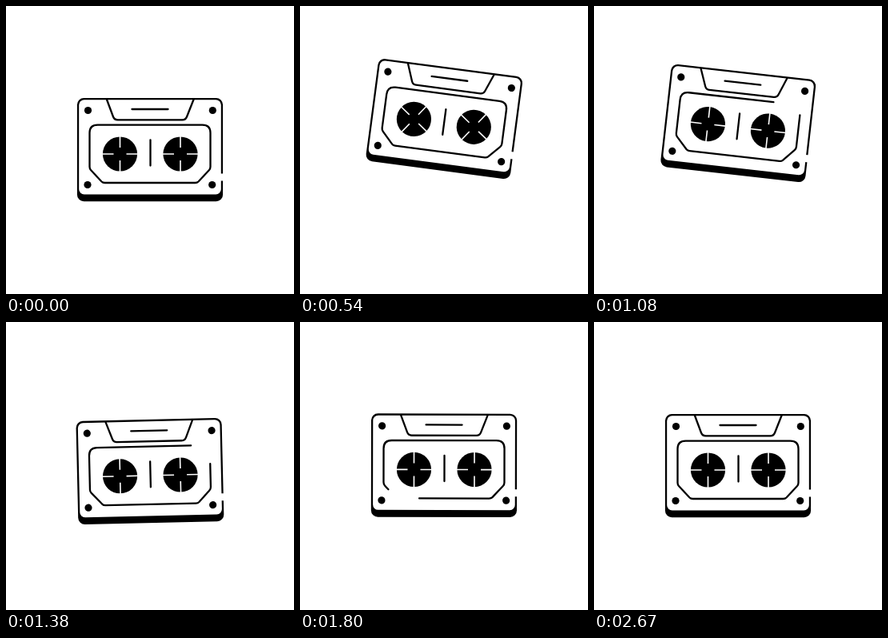
Recreate the animation shown at these times as an HTML page. Size 360 px wide and 360 px high, loop 2.73 s.

```html
<!DOCTYPE html>
<html lang="en">
<head>
<meta charset="utf-8">
<title>Cassette</title>
<style>
  html, body { margin: 0; width: 100%; height: 100%; overflow: hidden; background: #fff; }
  svg { display: block; width: 100%; height: 100%; }
  .line { fill: none; stroke: #000; stroke-width: 2.3; stroke-linecap: round; stroke-linejoin: round; }
  .cut { fill: none; stroke: #fff; stroke-width: 1.6; }
</style>
</head>
<body>
<svg viewBox="0 0 360 360">
  <defs>
    <g id="reel">
      <circle r="21.6"/>
      <path class="cut" d="M0-22.5V-8M0 22.5V8M-22.5 0H-8M22.5 0H8"/>
    </g>
  </defs>
  <g id="tape">
    <rect x="88.9" y="115" width="182.2" height="129.3" rx="8.5"/>
    <rect x="91.2" y="117.3" width="177.6" height="118.2" rx="6.5" fill="#fff"/>
    <path d="M268 209.5H273V218.5H268Z" fill="#fff"/>
    <path class="line" d="M126 117L134 138.500Q135.500 142.300 139.500 142.300H220.500Q224.500 142.300 226 138.500L234.500 117M157.500 129H202.500M180.500 167.500V199.500"/>
    <path class="line" id="frame" pathLength="417" d="M221 148.600H245.500Q255.500 148.600 255.500 158.600V201Q255.500 203.500 253.800 205.300L240.500 219.500Q239 221 236.500 221H123.500Q121 221 119.500 219.500L106.200 205.300Q104.500 203.500 104.500 201V158.600Q104.500 148.600 114.500 148.600Z"/>
    <circle cx="102.500" cy="130.500" r="4.600"/>
    <circle cx="258.300" cy="130.500" r="4.600"/>
    <circle cx="102" cy="223.500" r="4.600"/>
    <circle cx="257.700" cy="223.500" r="4.600"/>
    <use class="spin" href="#reel" data-x="142.500"/>
    <use class="spin" href="#reel" data-x="218"/>
  </g>
</svg>
<script>
const LOOP = 2730, LAST = 74, EDGE = 417, GAP = 43;
// [step, vertical shift]
const LIFT = [[0, 0], [9, -41.6], [24, -33.2], [30, -33.2], [38.5, 7.3], [50, -0.5], [60, 0], [75, 0]];

const tape = document.getElementById('tape');
const frame = document.getElementById('frame');
const reels = document.querySelectorAll('.spin');

function smooth(a, b, x) {
  const u = Math.min(1, Math.max(0, (x - a) / (b - a)));
  return u * u * (3 - 2 * u);
}

function lift(n) {
  const i = LIFT.findIndex(k => k[0] > n);
  const [a, from] = LIFT[i - 1], [b, to] = LIFT[i];
  return from + (to - from) * smooth(a, b, n);
}

// Five steps per 180 ms, the first one held twice as long.
function stepAt(ms) {
  const part = Math.max(0, Math.floor(ms % 180 / 30) - 1);
  return Math.min(LAST, Math.floor(ms / 180) * 5 + part);
}

function draw(n) {
  const y = lift(n);
  tape.setAttribute('transform', `translate(0 ${y}) rotate(${-y * 0.194} 180 182)`);

  const turn = 90 * smooth(8, 24, n);
  for (const reel of reels)
    reel.setAttribute('transform', `translate(${reel.dataset.x} 185) rotate(${turn})`);

  // A gap opens in the window outline, runs round it once and closes.
  const gap = GAP * (smooth(20, 30, n) - smooth(62, 72, n));
  const start = EDGE * smooth(35, 66, n);
  frame.style.strokeDasharray = gap > 0.01 ? `${EDGE - gap} ${gap}` : 'none';
  frame.style.strokeDashoffset = EDGE - gap - start;
}

const begin = performance.now();
function tick() {
  draw(stepAt((performance.now() - begin) % LOOP));
  requestAnimationFrame(tick);
}
tick();
</script>
</body>
</html>
```
